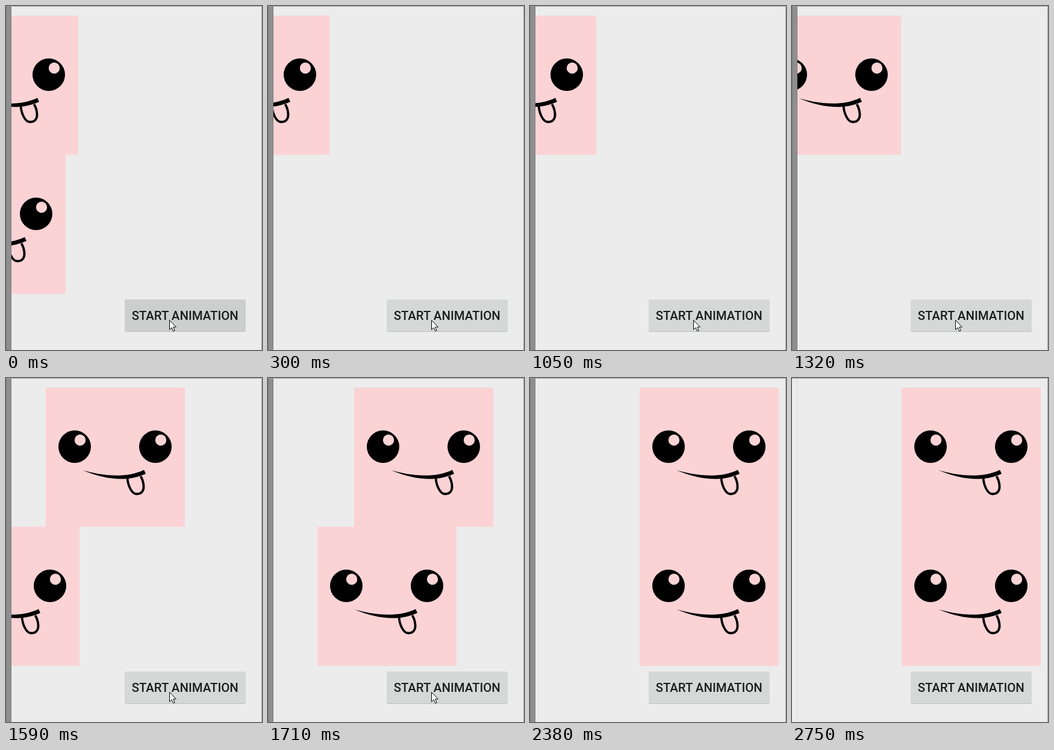
Animation of 425 by 571 pixels, one loop 2850 ms. Source, as an HTML page:

```html
<!DOCTYPE html>
<html lang="en">
<head>
<meta charset="utf-8">
<title>Anticipate animation</title>
<style>
  html, body { margin: 0; width: 100%; height: 100%; overflow: hidden; background: #ececec; }
  svg { display: block; width: 425px; height: 571px; }
  text { font: 500 20.4px Roboto, sans-serif; text-anchor: middle; fill: #1c1d1d; }
</style>
</head>
<body>
<svg viewBox="0 0 425 571">
  <defs>
    <clipPath id="screen"><rect x="9" y="16.5" width="415" height="554.5"/></clipPath>
    <g id="eye">
      <circle r="27"/>
      <circle cx="9" cy="-11" r="9.2" fill="#fbd3d5"/>
    </g>
    <g id="face">
      <rect y="-1" width="231" height="231" fill="#fbd3d5"/>
      <use href="#eye" x="48" y="97"/>
      <use href="#eye" x="182" y="97"/>
      <path d="M61 136C85 143 130 152 163 135.5L166 142C135 156 100 152 61 136Z"/>
      <path d="M135.5 148C136 160 142 175.5 151 175.5C160 175.5 163 169 162.5 162C162 155 160 150 157.5 146"
            fill="none" stroke="#000" stroke-width="3.8"/>
    </g>
  </defs>

  <rect width="425" height="571" fill="#ececec"/>

  <g clip-path="url(#screen)">
    <use id="top" href="#face"/>
    <use id="bottom" href="#face"/>
  </g>

  <rect x="197" y="488" width="201" height="53" rx="3" fill="#bcbebd"/>
  <rect id="button" x="197" y="487" width="201" height="53" rx="3" fill="#d6d8d7"/>
  <text x="297.2" y="521">START ANIMATION</text>

  <rect x="8" y="1" width="1" height="570" fill="#d8d8d8"/>
  <g id="strip">
    <rect y="1" width="9" height="570" fill="#8f8f8f"/>
    <path d="M.5 1V571M8.5 1V571" stroke="#7b7b7b"/>
  </g>
  <path d="M0 .5H424.5V571" fill="none" stroke="#a0a0a0"/>

  <path id="cursor" d="M.5 .5V16.3L4.1 12.9L6.7 18.7L9.2 17.6L6.7 11.9H11.4Z"
        fill="#fff" stroke="#000" stroke-linejoin="round"/>
</svg>
<script>
  const LOOP = 2850;
  const $ = id => document.getElementById(id);

  // Plays [time, style] steps with hard changes between them.
  function play(id, steps) {
    const frames = steps.map(([time, style]) => ({ ...style, offset: time / LOOP, easing: 'step-end' }));
    frames.push({ ...steps.at(-1)[1], offset: 1 });
    $(id).animate(frames, { duration: LOOP, iterations: Infinity });
  }

  const move = (x, y) => ({ transform: `translate(${x}px, ${y}px)` });

  // Pulls back before shooting forward; higher tension pulls back further.
  const anticipate = (p, tension) => p * p * ((tension + 1) * p - tension);

  // [time, progress of the slide]
  const progress = [
    [0, .1], [150, .166], [300, .252], [420, .31], [540, .367], [660, .426],
    [780, .485], [930, .553], [1050, .622], [1200, .7], [1320, .775],
    [1470, .843], [1590, .908], [1710, .972], [1830, 1]
  ];

  const START = -106, END = 182;
  const slide = (id, y, tension) => play(id, progress.map(([time, p]) =>
    [time, move(Math.round(START + (END - START) * anticipate(p, tension)), y)]));

  slide('top', 17, 2);
  slide('bottom', 248, 10);

  play('button', [[0, { fill: '#cdcfce' }], [150, { fill: '#d6d8d7' }]]);
  play('cursor', [
    [0, move(271, 521)], [2110, move(290, 538)], [2230, move(314, 559)], [2380, move(314, 580)]
  ]);
  play('strip', [[0, { opacity: 1 }], [2750, { opacity: 0 }]]);
</script>
</body>
</html>
```
